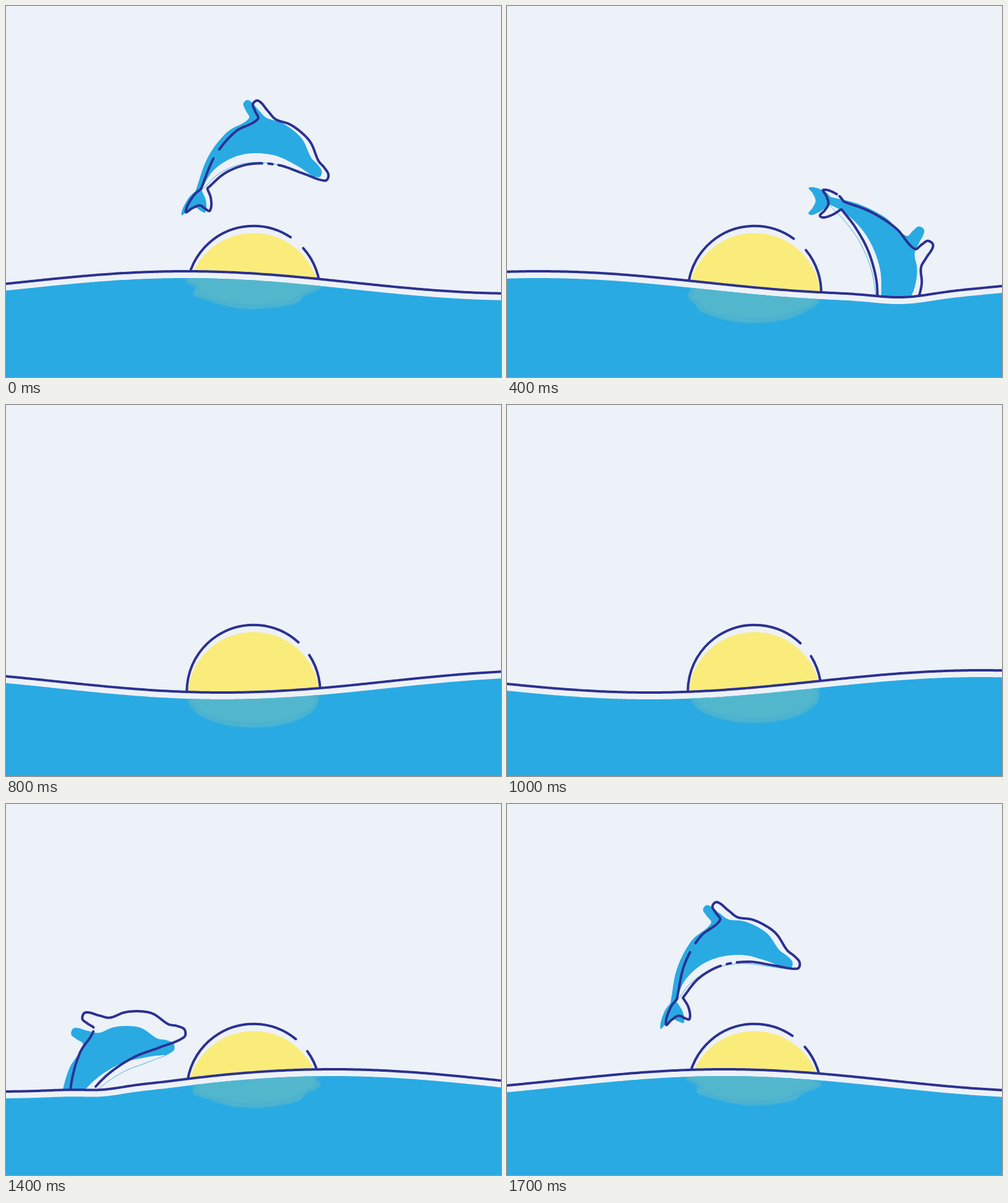
Recreate the animation shown at these times as an HTML page with a canvas. Size 800 by 600 pixels, loop 1.8 s.

```html
<!DOCTYPE html>
<html lang="en">
<head>
<meta charset="utf-8">
<title>Dolphin at sunrise</title>
<style>
  html, body { margin: 0; width: 100%; height: 100%; overflow: hidden; background: #edf1f8; }
  canvas { display: block; width: 800px; height: 600px; }
</style>
</head>
<body>
<canvas id="stage" width="800" height="600"></canvas>
<script>
const ctx = document.getElementById('stage').getContext('2d');
const W = 800, H = 600, LOOP = 1800, STEP = 100;
const SKY = '#edf1f8', BLUE = '#29aae3', INK = '#2b3192', SUN = '#faec7b';
const DROP = 11;      // distance between a line and its fill
const LAG = 0.23;     // how far the dolphin's fill trails its line, in steps
const TAU = Math.PI * 2, RAD = TAU / 360;

const cubic = (t, a, b, c, d) => a + t * (b + t * (c + t * d));
const bell = (x, mid, width) => Math.exp(-((x - mid) ** 2) / (2 * width * width));
const cycle = (t, at) => Math.cos(TAU * (t - at) / LOOP);

/* ---------- dolphin ---------- */
// Side view, x from tail base to nose, y up.
const HEAD = [[222, 0], [216, 12], [206, 23], [196, 51], [181, 67], [160, 80]];
const FIN = [[136, 87], [124, 100], [109, 117], [99, 112], [101, 101], [104, 87]];
const BACK = [[63, 69.5], [24, 39]];
const TAIL = [[-5, 4], [-19, -2], [-34, -21], [-23, -20], [-10, -21], [-2, -30],
  [5, -40], [9, -24], [5, -4]];
const BELLY = [[39, 7.5], [82, 15], [130, 12.5], [172, 1], [214, -9]];
const SHAPE = [...HEAD, ...FIN, ...BACK, ...TAIL, ...BELLY];
const COUNT = SHAPE.length;
const tailStart = COUNT - BELLY.length - TAIL.length;
const bellyStart = COUNT - BELLY.length - 1;

// Arches the body: shortens it towards the nose and lifts its middle.
function arch([x, y], bend) {
  if (x < 0) return [x, y + 0.3 * bend * x];
  return [x - 17 * bend * (x / 205) ** 2,
    y + 18 * bend * Math.sin(Math.PI * (x / 215) ** 0.6)];
}

// s counts steps from the top of the jump.
function poseAt(s) {
  const cx = cubic(s, 413.8, 54.5, -1.32, 0.193);
  const cy = cubic(s, 220.6, 8.33, 11.16, -0.463);
  const turn = Math.min(80, cubic(s, -7, 11.9, 1.53, 0.093)) * RAD;
  const bend = Math.max(0, 1.04 - ((s + 0.5) / 2.45) ** 2);
  const c = Math.cos(turn), d = Math.sin(turn);
  return SHAPE.map(p => {
    const [px, py] = arch(p, bend);
    const x = px - 102, y = py - 50 - 15 * bend;
    return [cx + x * c + y * d, cy + x * d - y * c];
  });
}

// Smooth closed curve through the points; returns u -> [x, y].
function curve(pts) {
  const pt = i => pts[(i + COUNT) % COUNT];
  const corner = i => i === tailStart || i === bellyStart;
  const unit = (a, b) => {
    const x = b[0] - a[0], y = b[1] - a[1], l = Math.hypot(x, y) || 1;
    return [x / l, y / l];
  };
  return u => {
    u = (u + COUNT) % COUNT;
    const i = Math.floor(u), s = u - i, r = 1 - s;
    const a = pt(i), b = pt(i + 1);
    const third = Math.hypot(b[0] - a[0], b[1] - a[1]) / 3;
    const da = corner(i) ? unit(a, b) : unit(pt(i - 1), b);
    const db = corner(i + 1) ? unit(a, b) : unit(a, pt(i + 2));
    return [0, 1].map(n =>
      r * r * r * a[n] + 3 * r * r * s * (a[n] + da[n] * third) +
      3 * r * s * s * (b[n] - db[n] * third) + s * s * s * b[n]);
  };
}

function trace(at, from, to) {
  const n = Math.ceil(Math.abs(to - from) * 12);
  for (let i = 0; i <= n; i++) ctx.lineTo(...at(from + (to - from) * i / n));
}

function strokeRange(at, from, to) {
  ctx.beginPath();
  trace(at, from, to);
  ctx.stroke();
}

function drawDolphin(t) {
  const s = (t < LOOP / 2 ? t : t - LOOP) / STEP;
  if (Math.abs(s) >= 6) return;

  const body = curve(poseAt(s - LAG));
  ctx.fillStyle = BLUE;
  ctx.beginPath();
  trace(body, 0, COUNT);
  ctx.fill();

  // Pale belly with a hairline below it
  const from = bellyStart, to = COUNT - 1.3;
  const inner = u => {
    const p = body(u), q = body(u + 0.02);
    const dx = q[0] - p[0], dy = q[1] - p[1], l = Math.hypot(dx, dy) || 1;
    const w = 15 * Math.max(0, Math.sin(Math.PI * (u - from) / (to - from))) ** 0.75;
    return [p[0] + dy / l * w, p[1] - dx / l * w];
  };
  ctx.fillStyle = SKY;
  ctx.beginPath();
  trace(body, from, to);
  trace(inner, to, from);
  ctx.fill();
  ctx.strokeStyle = BLUE;
  ctx.lineWidth = 0.8;
  strokeRange(body, from, to);

  // Outline, with gaps that slide along back and belly
  const line = curve(poseAt(s));
  const back = 12.75 + 0.5 * s, belly = 24.42 + 0.43 * s;
  ctx.strokeStyle = INK;
  ctx.lineWidth = 4;
  strokeRange(line, belly + 0.6 - COUNT, back);
  strokeRange(line, back + 0.33, belly);
  strokeRange(line, belly + 0.23, belly + 0.38);
}

/* ---------- sea ---------- */
function seaY(x, t) {
  const swell = 447 - 18 * Math.cos(TAU * ((x - 290) / 1074 + t / LOOP));
  const leap = bell(t, 1500, 70);
  const plunge = 0.7 * bell(t, 400, 60) - bell(t, 600, 70);
  return swell + leap * (12 * bell(x, 157, 30) + 5 * bell(x, 245, 50)) +
    plunge * 10 * bell(x, 640, 42);
}

function seaPath(t, drop) {
  for (let x = -8; x <= W + 8; x += 4) ctx.lineTo(x, seaY(x, t) + drop);
}

function reflectionPath(mid, t, rx, ry) {
  const sway = 4 + 4 * cycle(t, 1700);
  ctx.beginPath();
  for (let i = 0; i <= 80; i++) {
    const a = -0.4 + (Math.PI + 0.8) * i / 80;
    const y = mid + ry * Math.sin(a);
    const fade = Math.min(1, Math.max(0, (y - mid + 6) / 10)) * Math.abs(Math.cos(a));
    ctx.lineTo(400 + rx * Math.cos(a) + sway * fade * Math.sin((y - 449) / 4.2), y);
  }
}

function drawSea(t) {
  ctx.save();
  ctx.beginPath();
  seaPath(t, DROP);
  ctx.lineTo(W + 8, H);
  ctx.lineTo(-8, H);
  ctx.closePath();
  ctx.fillStyle = BLUE;
  ctx.fill();
  ctx.clip();

  const mid = seaY(400, t) + DROP;
  ctx.filter = 'blur(1.6px)';
  ctx.fillStyle = '#52b7cd';
  reflectionPath(mid, t, 105, 46);
  ctx.fill();
  ctx.strokeStyle = '#47afd2';
  ctx.lineWidth = 3;
  reflectionPath(mid, t, 101, 41);
  ctx.stroke();
  ctx.restore();

  ctx.strokeStyle = INK;
  ctx.lineWidth = 4;
  ctx.beginPath();
  seaPath(t, 0);
  ctx.stroke();
}

/* ---------- sun ---------- */
function drawSun(t) {
  const x = 400, y = 463.5, r = 107.8;
  ctx.fillStyle = SUN;
  ctx.beginPath();
  ctx.arc(x, y + DROP, r - 0.5, 0, TAU);
  ctx.fill();

  const gap = -51.5 - 5 * cycle(t, 100);
  ctx.strokeStyle = INK;
  ctx.lineWidth = 4;
  ctx.beginPath();
  ctx.arc(x, y, r, (gap + 14.4) * RAD, (gap + 360) * RAD);
  ctx.stroke();
}

function draw(t) {
  ctx.fillStyle = SKY;
  ctx.fillRect(0, 0, W, H);

  // Everything above the waterline
  ctx.save();
  ctx.beginPath();
  ctx.moveTo(-8, -8);
  seaPath(t, 0);
  ctx.lineTo(W + 8, -8);
  ctx.closePath();
  ctx.clip();
  drawSun(t);
  drawDolphin(t);
  ctx.restore();

  drawSea(t);
}

ctx.lineCap = ctx.lineJoin = 'round';
const start = performance.now();
function tick() {
  const t = (performance.now() - start) % LOOP;
  draw(Math.floor(t / STEP) * STEP);
  requestAnimationFrame(tick);
}
tick();
</script>
</body>
</html>
```
